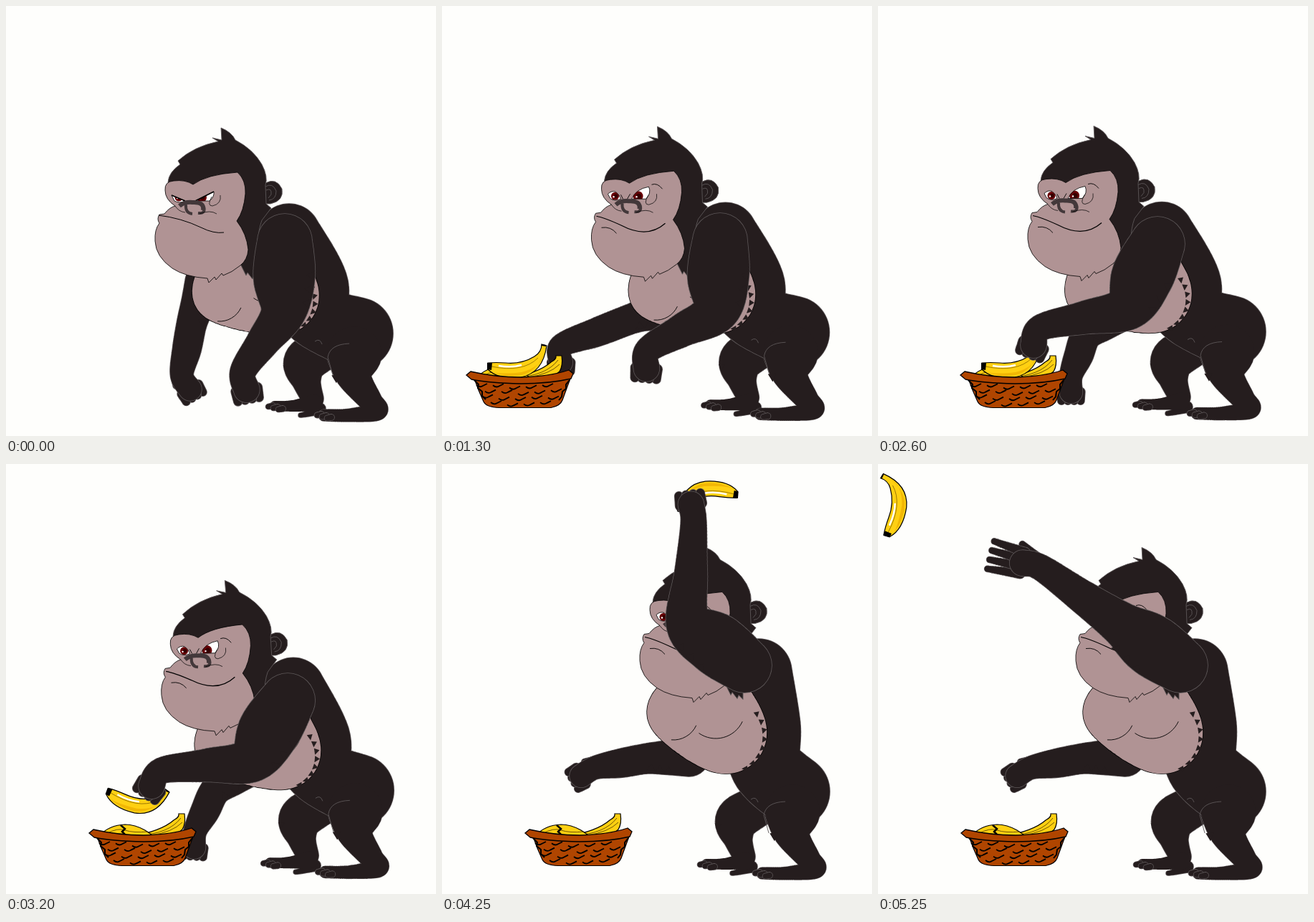
Write an HTML page with a canvas that moves like this. It is 600 by 600 pixels and loops after 5350 ms.

```html
<!DOCTYPE html>
<html lang="en">
<head>
<meta charset="utf-8">
<title>Gorilla and bananas</title>
<style>
html, body { margin: 0; height: 100%; overflow: hidden; background: #fefefc; }
canvas { display: block; }
</style>
</head>
<body>
<canvas id="stage" width="600" height="600"></canvas>
<script>
const ctx = document.getElementById('stage').getContext('2d');
const FUR = '#251d1e', SKIN = '#b09394', RIM = '#5d5758', INK = '#000';
const YELLOW = '#ffd012', BROWN = '#b04500';
const LOOP = 5350;

// Arm pose: shoulder x, y, then angles of upper arm, forearm and hand, then forearm length.
const near = {
  bone: 98, radii: [38, 43, 31, 23, 18, 18],
  stand: [389, 328, 91, 124, 79, 101],
  reach: [388, 327, 93, 150, 95, 110],
  grab: [390, 332, 115, 167, 112, 125],
  hold: [409, 320, 156, 205, 185, 123],
  raise: [422, 281, 217, 273, 262, 140],
  toss: [422, 281, 215, 215, 194, 140]
};
const far = {
  bone: 60, radii: [28, 24, 21, 20, 16, 16],
  stand: [278, 385, 108, 101, 60, 74],
  stretch: [325, 420, 165, 159, 90, 108],
  pull: [325, 420, 161, 140, 90, 60],
  lean: [340, 425, 145, 111, 90, 60],
  hold: [345, 400, 142, 143, 115, 77],
  raise: [345, 408, 177, 170, 150, 72]
};
// Body parts are chains of x, y, radius.
const torso = {
  low: [395, 320, 44, 420, 390, 57, 432, 432, 45, 490, 457, 50],
  mid: [425, 297, 45, 438, 365, 52, 452, 420, 50, 492, 458, 50],
  high: [442, 290, 46, 448, 365, 52, 452, 420, 50, 491, 457, 50]
};
const chest = {
  low: [385, 375, 40, 385, 412, 46, 298, 407, 34, 305, 370, 36],
  mid: [395, 350, 40, 396, 397, 46, 313, 372, 35, 325, 345, 36],
  high: [395, 330, 38, 398, 380, 52, 323, 350, 36, 345, 318, 36]
};

const rising = p => [[3100, p.low], [3700, p.mid], [4250, p.high]];
const tracks = {
  near: [[700, near.stand], [1300, near.reach], [2100, near.reach], [2600, near.grab],
    [3100, near.grab], [3700, near.hold], [4250, near.raise], [4750, near.toss]],
  far: [[700, far.stand], [1300, far.stretch], [1900, far.pull], [2600, far.lean],
    [3100, far.lean], [3700, far.hold], [4250, far.raise]],
  torso: rising(torso),
  chest: rising(chest),
  bob: [[0, [0, 0]], [700, [1, -2.5]], [1900, [0, -1]], [2600, [1, -2.5]], [3100, [1, -2]], [3700, [0, 0]]],
  legs: [[1200, [0, 0]], [1900, [0, -8]], [3100, [0, -8]], [3700, [3, -6]]],
  head: [[3100, [300, 170, 0]], [3700, [327, 135, -7.7]], [4250, [368, 116.5, 0]]],
  basket: [[1300, [0]], [2100, [80]], [3100, [82]]],
  grip: [[3100, [-29, 32, 0]], [3700, [4, -29, 120]], [4250, [24, -17, 184]], [4750, [0, -20, 150]]],
  fingers: [[4450, [0]], [4750, [1]]]
};

const lerp = (a, b, k) => a.map((v, i) => v + (b[i] - v) * k);

function sample(keys, t) {
  const n = keys.findIndex(key => key[0] > t);
  if (n === 0) return keys[0][1];
  if (n < 0) return keys[keys.length - 1][1];
  const [t0, a] = keys[n - 1], [t1, b] = keys[n];
  return lerp(a, b, (t - t0) / (t1 - t0));
}

const polar = ([x, y], degrees, d) =>
  [x + d * Math.cos(degrees * Math.PI / 180), y + d * Math.sin(degrees * Math.PI / 180)];

function shape(path, fill, stroke, width = 1) {
  path = new Path2D(path);
  if (fill) { ctx.fillStyle = fill; ctx.fill(path); }
  if (stroke) { ctx.strokeStyle = stroke; ctx.lineWidth = width; ctx.stroke(path); }
}
const fur = path => shape(path, FUR, RIM, 0.9);
const line = (path, color = INK, width = 0.9) => shape(path, null, color, width);

function arc([x, y], r, from, to) {
  const [a, b] = [from, to].map(d => polar([x, y], d, r));
  line(`M${a}A${r},${r} 0 0 1 ${b}`);
}

function dot(x, y, r, color) {
  ctx.fillStyle = color;
  ctx.beginPath();
  ctx.arc(x, y, r, 0, 7);
  ctx.fill();
}

function at(x, y, draw, degrees = 0) {
  ctx.save();
  ctx.translate(x, y);
  ctx.rotate(degrees * Math.PI / 180);
  draw();
  ctx.restore();
}

// Fills the union of circles along a smooth curve through the nodes.
function limb(nodes, fill = FUR, rim = RIM) {
  const steps = 14, beads = [];
  for (let i = 0; i < nodes.length - 1; i++) {
    const b = nodes[i], c = nodes[i + 1], a = nodes[i - 1] || b, d = nodes[i + 2] || c;
    for (let s = 0; s <= steps; s++) {
      const k = s / steps;
      beads.push(b.map((v, j) => v + k / 2 * (c[j] - a[j] + k * (2 * a[j] - 5 * v + 4 * c[j] - d[j]
        + k * (3 * (v - c[j]) + d[j] - a[j])))));
    }
  }
  for (const [color, grow] of rim ? [[rim, 0.8], [fill, 0]] : [[fill, 0]]) {
    ctx.fillStyle = color;
    ctx.beginPath();
    for (const [x, y, r] of beads) {
      ctx.moveTo(x + r + grow, y);
      ctx.arc(x, y, r + grow, 0, 2 * Math.PI);
    }
    ctx.fill();
  }
}

const chain = flat => flat.flatMap((v, i) => i % 3 ? [] : [flat.slice(i, i + 3)]);

// A pointed tuft of fur whose tip leans towards the given angle.
function tuft(p, degrees, size, color = FUR) {
  shape(`M${polar(p, degrees + 90, size / 2)}L${polar(p, degrees, size)}L${polar(p, degrees - 90, size / 2)}Z`, color);
}

function joints(kind, [x, y, up, fore, hand, length]) {
  const shoulder = [x, y], elbow = polar(shoulder, up, kind.bone);
  const wrist = polar(elbow, fore, length), palm = polar(wrist, hand, 26 * kind.radii[5] / 18);
  return { shoulder, elbow, wrist, palm };
}

function arm(kind, pose, spread = 0) {
  const { shoulder, elbow, wrist, palm } = joints(kind, pose);
  const [, , up, , hand] = pose, size = kind.radii[5] / 18;
  const thumb = polar(wrist, hand + 90, 10);
  limb([[...thumb, 6], [...polar(thumb, hand + 25, 10 + 26 * spread), 4.5]]);
  for (let i = 0; i < 4; i++) {
    const base = polar(palm, hand - 90, (1.5 - i) * 10 * size);
    const reach = (14 + 32 * spread) * size;
    limb([[...base, 7 * size], [...polar(base, hand + (i - 1.5) * 4 * spread, reach), (6 - 2 * spread) * size]]);
  }
  const nodes = [shoulder, lerp(shoulder, elbow, 0.5), elbow, lerp(elbow, wrist, 0.5), wrist, palm];
  limb(nodes.map((p, i) => [...p, kind.radii[i]]));
  for (const k of [0.45, 0.65, 0.85])
    tuft(polar(lerp(shoulder, elbow, k), up - 90, kind.radii[1] - 14 * k), up - 25, 11);
}

function banana() {
  shape('M-41,-5L-41,4Q-26,19 5,15Q36,9 41,-29L34,-31Q34,-20 24,-14Q6,-3 -16,-5Q-30,-6 -41,-5Z', YELLOW, INK, 1.2);
  shape('M-34,8Q-10,17 10,11Q28,4 37,-18Q33,1 6,8Q-20,11 -34,8Z', '#f2b705');
  line('M-36,0Q8,9 29,-12', '#7a5c00', 0.7);
  line('M-26,-1Q-8,2 6,-2', '#fff', 2.5);
  shape('M-42,-5L-35,-5L-36,5L-42,4Z', INK);
  line('M34,-30L40,-29', INK, 2);
}

function looseBananas() {
  shape('M92,520Q135,512 152,497Q160,493 159,488L167,488Q169,502 164,510Q150,524 92,520Z', YELLOW, INK, 1.2);
  line('M104,518Q145,516 162,494M120,518Q150,514 164,500', '#4a3800', 0.8);
  shape('M49,518Q62,504 84,503Q98,503 112,511L128,522Z', YELLOW, INK, 1.2);
  line('M58,516Q74,507 84,511Q96,515 116,513', '#4a3800', 0.8);
  line('M78,504L84,509L80,513L86,519', INK, 2.5);
}

function basket() {
  shape('M44,517L51,536L58,552Q62,560 80,560.5L152,560.5Q165,558 168,550L180,517Q112,530 44,517Z', BROWN, INK, 1.2);
  for (let row = 0; row < 4; row++) {
    for (let x = 55 + row * 4 + row % 2 * 8; x < 168 - row * 4; x += 23) {
      const y = 531 + row * 8 + x * 7 % 3 - Math.abs(x - 110) / 18;
      line(`M${x - 7},${y}Q${x - 2},${y + 4} ${x + 2},${y + 1}L${x + 8},${y - 2}`, INK, 1.8);
    }
  }
  line('M45,522l6,6l-1,5l6,5l0,6l5,5M178,522l-5,6l0,6l-5,4l-1,7l-4,5', INK, 2);
  shape('M34,515L40,510Q75,518 110,518Q150,517 177,508L183,513L180,520Q150,527 110,527Q65,526 41,521Z', BROWN, INK, 1.3);
}

function toes(x, y) {
  for (let i = 0; i < 3; i++) limb([[x + i * 7 + 6, y + i * 2 - 1, 4], [x + i * 7, y + i * 2, 3.5]]);
}

function farLeg() {
  limb([[438, 562, 8], [420, 569, 4], [411, 571, 3]]);
  limb([[446, 478, 28], [418, 496, 30], [419, 522, 20], [428, 548, 15]]);
  limb([[430, 554, 12], [400, 558, 8], [375, 558, 7]], FUR, null);
  toes(366, 559);
  tuft([391, 502], 100, 9);
}

function nearLeg(rim) {
  limb([[486, 485, 38], [485, 515, 24], [508, 550, 16], [518, 565, 13], [480, 571, 9], [444, 571, 8]], FUR, rim);
  toes(434, 571);
  tuft([460, 515], 85, 11);
}

function eyes(narrow) {
  const left = narrow ? 'M231,264L250,272Q242,276 235,272Z' : 'M231,264Q236,259 242,261Q248,266 249,271Q240,275 234,270Z';
  const right = narrow ? 'M264,272L290,259Q291,266 284,272Z' : 'M264,271Q270,257 288,254Q292,263 284,271Z';
  for (const [path, x, y, r] of [[left, 241, 267, 5.5], [right, 273, 267, 7]]) {
    shape(path, '#fff');
    ctx.save();
    ctx.clip(new Path2D(path));
    dot(x, y, r, '#680006');
    dot(x + 1, y, r / 2, '#300');
    dot(x - 2, y + 1, 1.2, '#fff');
    ctx.restore();
    line(path, INK, 0.8);
  }
  if (narrow) line('M231,264L250,272M264,272L290,259', INK, 1.6);
  else line('M249,265L252,271M262,264L258,271M292,251Q300,248 307,257');
}

function head(mood) {
  fur('M362,247Q377,239 385,255Q388,272 369,276L358,276');
  line('M362,252Q372,246 377,258Q377,270 367,271M363,257Q371,253 370,263L366,268', RIM);
  fur('M226,246Q227,232 243,221L240,216Q262,196 296,189L288,184L301,187L300,170Q315,176 320,187Q345,200 357,221Q366,238 362,250L363,276L370,282L357,299Q352,312 352,330L352,382L346,376L344,381L337,372L335,376L328,362');
  shape('M222,257Q221,245 234,244Q250,242 261,249Q280,235 323,232Q335,243 334,262Q332,286 322,300Q336,318 338,340Q337,354 327,362Q315,372 303,376L301,373L293,382L291,378L283,386L281,380Q250,378 232,366Q209,350 208,328Q207,312 214,303Q210,297 214,291L221,290Q228,281 236,279Q222,270 222,257Z', SKIN, INK, 0.8);
  eyes(mood === 'frown');
  line('M242,279Q249,273 260,274Q277,273 275,285', '#43383a', 6);
  line('M251,277Q250,289 260,290M276,280Q279,290 268,289', '#43383a', 4);
  line('M287,266Q280,279 288,279Q301,276 299,264M270,290Q285,284 294,290M236,279Q241,287 250,288', INK, 0.7);
  if (mood === 'frown') line('M213,292Q245,296 272,309Q290,318 304,316', INK, 1);
  if (mood === 'grin') {
    shape('M220,289Q247,304 283,316Q265,318 245,308Q232,300 214,299Z', '#fff', INK, 1);
    line('M230,294l0,5M236,298l0,5M244,301l0,6M254,305l0,6M219,290Q265,321 306,317');
  }
  if (mood === 'smirk') {
    line('M215,295Q226,297 250,308Q286,327 311,305', INK, 1.2);
    line('M222,311Q235,309 243,319');
  }
}

function belly(nodes) {
  limb(nodes, SKIN, INK);
  const [, main, breast] = nodes;
  for (let a = -40; a <= 70; a += 14) tuft(polar(main, a, main[2] + 1), a + 120, 8);
  arc(breast, breast[2] - 1, 25, 95);
  arc([main[0] - 16, main[1] - 38], 41, 25, 125);
}

function holding(t, palm, shift) {
  if (t <= 3100) return [105 + shift, 503, 0];
  const [dx, dy, turn] = sample(tracks.grip, t);
  const held = [palm[0] + dx, palm[1] + dy, turn];
  return t > 4750 ? lerp(held, [24, 61, 286], (t - 4750) / 500) : held;
}

function draw(t) {
  ctx.fillStyle = '#fefefc';
  ctx.fillRect(0, 0, 600, 600);
  const pose = sample(tracks.near, t);
  const [shift] = sample(tracks.basket, t);
  const [bx, by] = sample(tracks.bob, t), [nearX, farX] = sample(tracks.legs, t);
  const [hx, hy, tilt] = sample(tracks.head, t);
  const mood = t < 300 ? 'frown' : t < 1300 ? 'grin' : 'smirk';

  arm(far, sample(tracks.far, t));
  if (t >= 300) {
    at(shift, 0, looseBananas);
    const [x, y, turn] = holding(t, joints(near, pose).palm, shift);
    at(x, y, banana, turn);
    at(shift, 0, basket);
  }
  at(bx, by, () => {
    at(farX, 0, farLeg);
    at(nearX, 0, () => nearLeg(RIM));
    limb(chain(sample(tracks.torso, t)));
    belly(chain(sample(tracks.chest, t)));
    at(nearX, 0, () => nearLeg(null));
    line('M479,471Q452,472 449,490L456,515M431,468Q438,463 441,472', RIM);
    at(hx, hy, () => { ctx.translate(-300, -170); head(mood); }, tilt);
  });
  arm(near, pose, sample(tracks.fingers, t)[0]);
}

// The picture advances every 100 ms, and every 50 ms during the wind-up and throw.
function hold(t) {
  const step = t >= 3900 && t < 4650 ? 50 : 100, from = t < 4650 ? 0 : 4650;
  return from + Math.floor((t - from) / step) * step;
}

const start = performance.now();
function tick() {
  draw(hold((performance.now() - start) % LOOP));
  requestAnimationFrame(tick);
}
tick();
</script>
</body>
</html>
```
